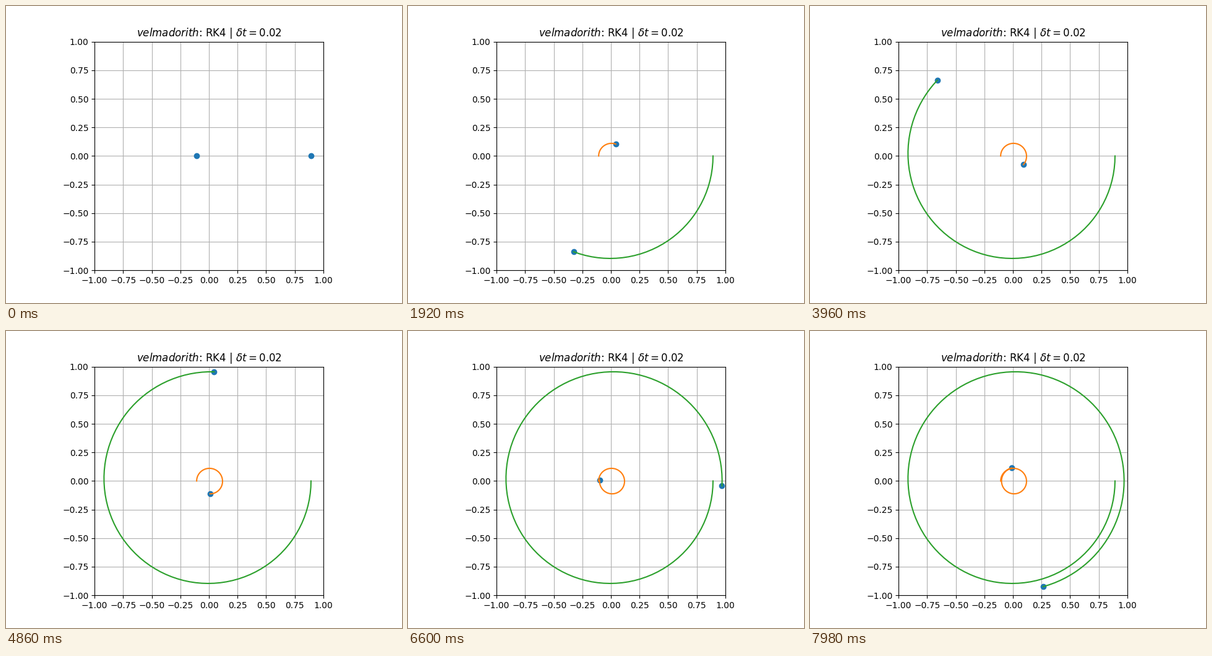
These frames come from a looping animation (640x480 px, 8 s). A matplotlib script:

```python
import numpy as np
import matplotlib.pyplot as plt
from matplotlib.animation import FuncAnimation

LOOP_MS = 8000
TICK_MS = 20
TICKS_PER_STEP = 3
TICKS = LOOP_MS // TICK_MS
STEPS = (TICKS - 1) // TICKS_PER_STEP + 1

STEP = 0.06077                       # time step, with G * total mass = 1
MASS = np.array([0.8925, 0.1075])


def rk4(pos, vel, other, mass, h):
    """Advance one body while the other one stays fixed."""
    def pull(p):
        d = other - p
        return mass * d / np.hypot(*d) ** 3

    v1, a1 = vel, pull(pos)
    v2, a2 = vel + a1 * h / 2, pull(pos + v1 * h / 2)
    v3, a3 = vel + a2 * h / 2, pull(pos + v2 * h / 2)
    v4, a4 = vel + a3 * h, pull(pos + v3 * h)
    return (pos + h / 6 * (v1 + 2 * v2 + 2 * v3 + v4),
            vel + h / 6 * (a1 + 2 * a2 + 2 * a3 + a4))


def orbit():
    """Positions of both bodies, shape (steps, body, xy)."""
    pos = np.array([[-MASS[1], 0.0], [MASS[0], 0.0]])
    vel = np.array([[0.0, MASS[1]], [0.0, -MASS[0]]])
    path = [pos]
    for _ in range(STEPS - 1):
        moved = [rk4(pos[i], vel[i], pos[1 - i], MASS[1 - i], STEP)
                 for i in range(2)]
        pos = np.array([p for p, _ in moved])
        vel = np.array([v for _, v in moved])
        path.append(pos)
    return np.array(path)


path = orbit()

fig, ax = plt.subplots(figsize=(6.4, 4.8), dpi=100)
ax.set_aspect("equal")
ax.set_xlim(-1, 1)
ax.set_ylim(-1, 1)
ax.set_xticks(np.linspace(-1, 1, 9))
ax.set_yticks(np.linspace(-1, 1, 9))
ax.grid()
ax.set_title(r"$velmadorith$: RK4 | $\delta t = 0.02$")

bodies, = ax.plot([], [], "o")
trails = [ax.plot([], [])[0] for _ in range(2)]


def draw(tick):
    n = tick // TICKS_PER_STEP
    bodies.set_data(path[n, :, 0], path[n, :, 1])
    for i, trail in enumerate(trails):
        trail.set_data(path[:n + 1, i, 0], path[:n + 1, i, 1])
    return [bodies, *trails]


anim = FuncAnimation(fig, draw, frames=TICKS, interval=TICK_MS,
                     init_func=lambda: draw(0), blit=True,
                     repeat=True, repeat_delay=0)
plt.show()
```
